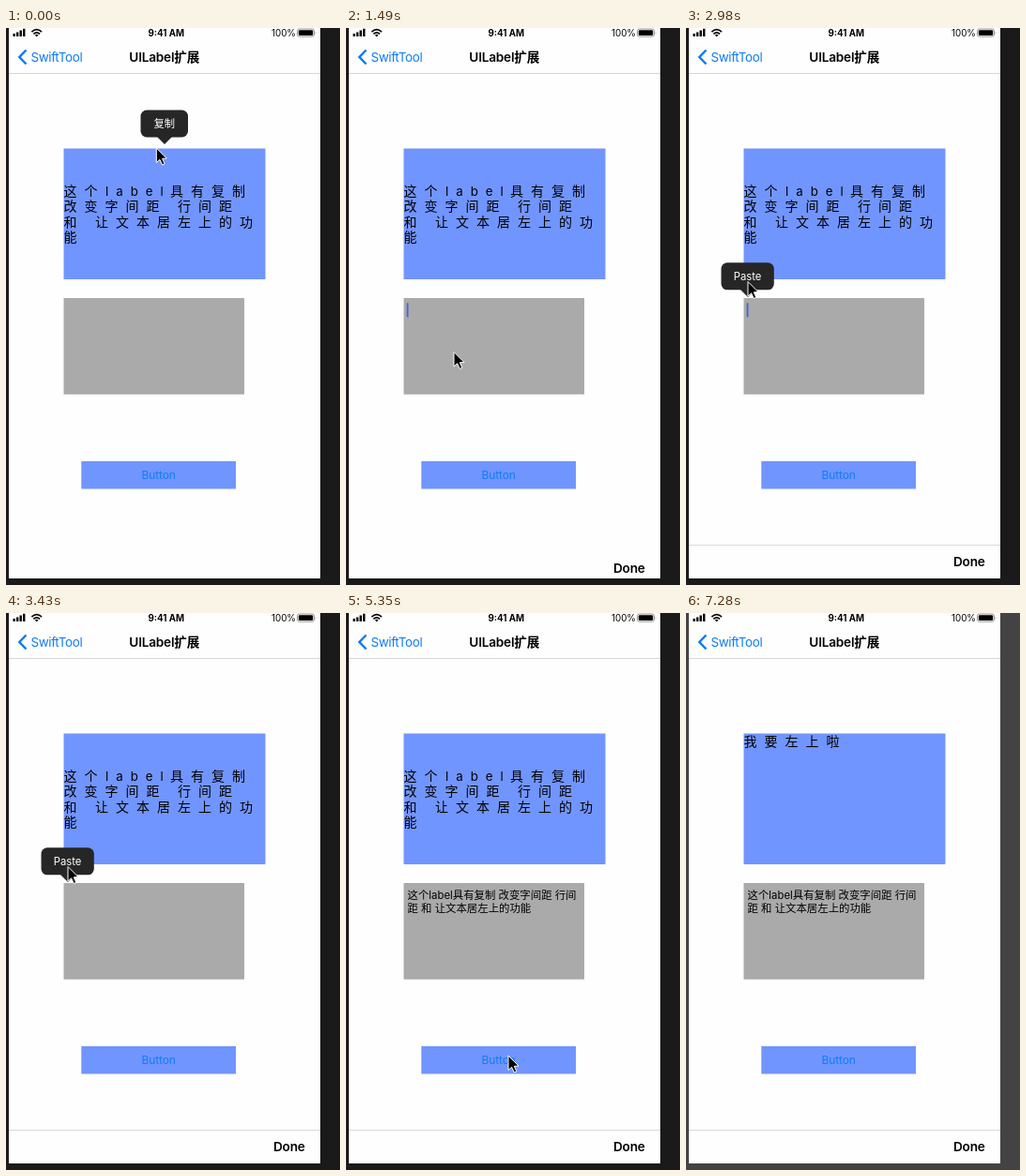
Animation, 356 px wide and 594 px high, one loop 7.38 s. Source, as an HTML page:

```html
<!DOCTYPE html>
<html lang="zh">
<head>
<meta charset="utf-8">
<style>
html, body { margin: 0; width: 100%; height: 100%; overflow: hidden; background: #1a1a1a; }
svg { display: block; width: 356px; height: 594px; }
text { font-family: Inter, "Noto Sans CJK SC", "Noto Sans CJK", sans-serif; white-space: pre; }
.wide { font-size: 14px; letter-spacing: 8px; }
.latin { font-size: 13.3px; }
.note { font-size: 11.4px; }
.menu text { font-size: 11.3px; fill: #fff; text-anchor: middle; }
.bold { font-weight: 600; font-size: 13.6px; letter-spacing: -.2px; }
</style>
</head>
<body>
<svg viewBox="0 0 356 594">
  <rect id="bezel" width="356" height="594"/>
  <rect x="3" width="332" height="587" fill="#fefefe"/>

  <!-- status bar -->
  <path d="M7.5 6h2.4v3H7.5zM11 4.5h2.4V9H11zM14.5 2.5h2.4V9h-2.4zM18 .8h2.4V9H18z"/>
  <path d="M27.4 4.2Q32.7-.9 38 4.2M29.4 6.4Q32.7 3.2 36 6.4" fill="none" stroke="#000" stroke-width="1.7"/>
  <path d="M30.9 7.6Q32.7 6 34.5 7.6L32.7 9.6z"/>
  <text x="170.8" y="8.7" font-size="9.7" font-weight="700" text-anchor="middle">9:41 AM</text>
  <text x="283" y="8.7" font-size="9.8">100%</text>
  <rect x="310.5" y="1" width="18" height="8.2" rx="2.2" fill="none" stroke="#888" stroke-width=".9"/>
  <rect x="311.8" y="2.2" width="15.4" height="5.8" rx="1.2"/>
  <path d="M329.8 3.7q1.4 1.4 0 2.8z" fill="#888"/>

  <!-- navigation bar -->
  <path d="M21.5 23.5L14.3 31l7.2 7.5" fill="none" stroke="#0f7cf8" stroke-width="2.5"/>
  <text x="26.4" y="35.6" font-size="13.4" letter-spacing="-.35" fill="#0f7cf8">SwiftTool</text>
  <text x="168.7" y="35.6" class="bold" text-anchor="middle">UILabel扩展</text>
  <rect x="3" y="48" width="332" height="1" fill="#d6d6d6"/>

  <rect x="61.5" y="128.5" width="215" height="139.5" fill="#7195ff"/>
  <g id="before" class="wide">
    <text x="61.5" y="179">这个</text>
    <text x="106" y="179" class="latin">label</text>
    <text x="175" y="179">具有复制</text>
    <text x="61.5" y="195.3">改变字间距</text>
    <text x="183" y="195.3">行间距</text>
    <text x="61.5" y="211.8">和</text>
    <text x="95" y="211.8">让文本居左上的功</text>
    <text x="61.5" y="228">能</text>
  </g>
  <text id="after" class="wide" x="61.5" y="141.8">我要左上啦</text>

  <rect x="61.5" y="288" width="192.5" height="102.7" fill="#aaa"/>
  <g id="pasted" class="note">
    <text x="65.5" y="305.2">这个label具有复制 改变字间距 行间</text>
    <text x="65.5" y="319">距 和 让文本居左上的功能</text>
  </g>
  <rect id="caret" width="1.8" height="15" fill="#3f68d8"/>
  <g id="loupe">
    <circle cx="118" cy="313.7" r="34.2" fill="#999" stroke="#888" stroke-width="1.6"/>
    <circle cx="118" cy="319" r="28" fill="#a2a2a2"/>
    <circle cx="118" cy="321" r="20" fill="#a8a8a8"/>
  </g>

  <rect x="80.3" y="462" width="164.7" height="29.5" fill="#7195ff"/>
  <text id="label" x="162.6" y="481.3" font-size="12" letter-spacing="-.1" fill="#107cfb" text-anchor="middle">Button</text>

  <rect id="line" x="3" y="551" width="332" height="1" fill="#d9d9d9"/>
  <text id="done" x="285" class="bold">Done</text>

  <g id="copy" class="menu">
    <rect x="143.5" y="87.5" width="50.5" height="29" rx="6.5" fill="#262626"/>
    <path d="M161 116h16l-8 8z" fill="#262626"/>
    <text x="168.7" y="106.3">复制</text>
  </g>
  <g id="paste" class="menu">
    <rect x="37.5" y="250.3" width="56.3" height="29" rx="6.5" fill="#262626"/>
    <path d="M58 279h16l-8 8z" fill="#262626"/>
    <text x="65.6" y="269">Paste</text>
  </g>

  <path id="cursor" d="M0 0V15.5L3.6 12.3 6.3 18 8.8 16.8 6.3 11.3 11 11z" stroke="#fff" stroke-linejoin="round"/>
</svg>
<script>
const LOOP = 7380, STEP = 148.6, BLINK = 3.1;
const $ = id => document.getElementById(id);
const clamp = v => Math.max(0, Math.min(1, v));
const show = (el, v) => { el.style.opacity = clamp(Number(v)); };

// pointer moves: first step, last step, x, y reached
const moves = [
  [0, 2, 166, 105], [3, 5, 172, 266], [5, 7, 115, 345.5], [11, 12, 116, 339.5],
  [16, 20, 66, 270.5], [24, 28, 237, 525], [28, 29, 217.3, 518],
  [29, 30, 174, 493], [30, 34, 173, 472], [43, 45, 176, 488]
];

function pointer(k) {
  let x = 160.3, y = 128;
  for (const [from, to, toX, toY] of moves) {
    const u = clamp((k - from) / (to - from)), e = u * u * (3 - 2 * u);
    x += (toX - x) * e;
    y += (toY - y) * e;
  }
  return [x, y];
}

function draw(t) {
  const k = Math.min(49, Math.floor((t + 5) / STEP));
  const last = k === 49, full = k >= 24, renamed = k >= 42;

  $('cursor').setAttribute('transform', `translate(${pointer(k)})`);
  show($('cursor'), !last);
  $('bezel').setAttribute('fill', last ? '#434343' : '#1a1a1a');

  show($('copy'), 3.5 - k);
  show($('paste'), Math.min(k - 17, 24.4 - k));

  // the blink starts anew after pasting
  const age = k - (full ? 24.5 : 7.5);
  show($('caret'), age >= 0 && Math.floor(age / BLINK) % 2 === 0);
  $('caret').setAttribute('x', full ? 197.2 : 64.7);
  $('caret').setAttribute('y', full ? 307 : 293.3);
  show($('pasted'), full);

  // the magnifier grows ring by ring from the inside
  [...$('loupe').children].forEach((ring, i) => show(ring, k >= 15 - i && k < 17));

  show($('line'), k >= 11);
  show($('done'), k >= 10);
  $('done').setAttribute('y', 574.2 + 7 * Math.max(0, 11 - k));

  show($('before'), !renamed);
  show($('after'), renamed);
  show($('label'), k < 41 ? 1 : .2 + .4 * Math.max(0, k - 42));
}

const start = performance.now();
function tick() {
  draw((performance.now() - start) % LOOP);
  requestAnimationFrame(tick);
}
draw(0);
requestAnimationFrame(tick);
</script>
</body>
</html>
```
